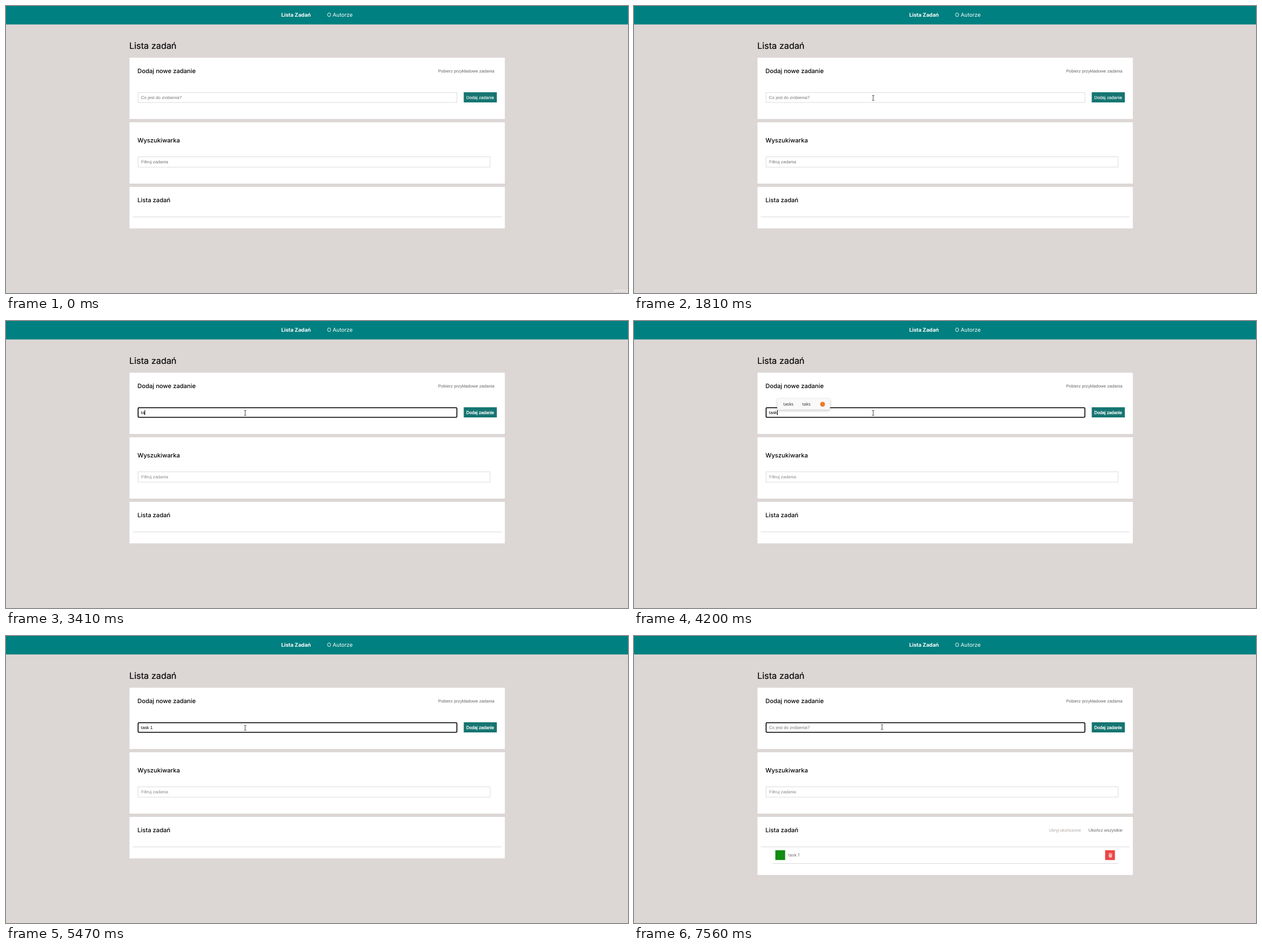
These frames come from a looping animation (1100x509 px, 8000 ms). An HTML page:

```html
<!DOCTYPE html>
<html lang="pl">
<head>
<meta charset="utf-8">
<title>Lista zadań</title>
<style>
  html, body { margin: 0; width: 100%; height: 100%; overflow: hidden; background: #dcd6d5; }
  svg { display: block; width: 100vw; height: 100vh; }
  text { text-rendering: geometricPrecision; white-space: pre; }
  .title { font: 400 15.5px Inter, sans-serif; stroke: #000; stroke-width: .15px; }
  .head { font: 500 10.7px Inter, sans-serif; }
  .nav { font: 400 9.55px Inter, sans-serif; fill: #fff; }
  .nav.on { font-weight: 700; font-size: 9.25px; }
  .ui { font: 7.67px "Liberation Sans", Arial, sans-serif; }
  .hint { fill: #757575; }
  .link { fill: #666; }
  .task { font: 400 7.5px Inter, sans-serif; fill: #707070; }
  .pop { font: 7.5px "Open Sans", sans-serif; fill: #222; }
</style>
</head>
<body>
<svg viewBox="0 0 1100 509">
  <defs>
    <filter id="soft" x="-20%" y="-50%" width="140%" height="220%">
      <feDropShadow dx="0" dy="2" stdDeviation="2" flood-opacity=".22"/>
    </filter>
  </defs>
  <rect width="1100" height="509" fill="#dcd6d5"/>
  <rect width="1100" height="32.7" fill="#008080"/>
  <text class="nav on" x="486.7" y="19.2">Lista Zadań</text>
  <text class="nav" x="567.7" y="19.2">O Autorze</text>
  <text class="title" x="218" y="76.3">Lista zadań</text>

  <g fill="#fff">
    <rect x="218.4" y="91.7" width="663.8" height="108.7"/>
    <rect x="218.4" y="206.2" width="663.8" height="108.8"/>
    <rect id="listBox" x="218.4" y="320.8" width="663.8" height="73.6"/>
  </g>

  <text class="head" x="232.5" y="118.8">Dodaj nowe zadanie</text>
  <text class="ui link" x="764.2" y="117.6">Pobierz przykładowe zadania</text>
  <rect id="field" x="233.5" y="153.5" width="564" height="17.6" fill="#fff"/>
  <text id="entry" class="ui" x="238.8" y="164.6"></text>
  <rect id="caret" y="158" width="1" height="9" fill="#000"/>
  <rect x="809.5" y="153" width="58.5" height="18" fill="#167571"/>
  <text id="button" class="ui" x="814" y="164.6" fill="#fff" stroke="#fff">Dodaj zadanie</text>

  <text class="head" x="232.5" y="242">Wyszukiwarka</text>
  <rect x="233.5" y="267.5" width="622.5" height="18.3" fill="#fff" stroke="#ddd"/>
  <text id="filter" class="ui" x="239" y="279.2">Filtruj zadania</text>

  <text class="head" x="232.5" y="348">Lista zadań</text>
  <rect x="224" y="373.5" width="652.5" height="1" fill="#d9d9d9"/>

  <g id="row">
    <text class="ui" x="734" y="346.7" fill="#aea69f">Ukryj ukończone</text>
    <text class="ui link" x="803.7" y="346.7">Ukończ wszystkie</text>
    <rect x="250" y="380" width="17.3" height="17.3" fill="#128c12"/>
    <text class="task" x="272.8" y="391.4">task 1</text>
    <rect x="833.2" y="380" width="17.3" height="17.3" fill="#ef4444"/>
    <path d="M839.2 386h6.4M839.9 387l.5 5.4h4.2l.5-5.4M841.5 387.5v4.5M843.4 387.5v4.5M841 385.3h2.8"
      fill="#d8a5a0" stroke="#eadbd8" stroke-width=".8"/>
    <rect x="244.5" y="403" width="611.5" height="1" fill="#dcdcdc"/>
  </g>

  <g id="popup">
    <rect id="popBox" x=".4" y="137.3" height="19.6" rx="3" fill="#f9f9f9" stroke="#e2e2e2" stroke-width=".6" filter="url(#soft)"/>
    <text id="word1" class="pop" x="11" y="150.2"></text>
    <text id="word2" class="pop" y="150.2"></text>
    <circle id="emoji" cy="147.6" r="4.3" fill="#ee7c2c"/>
  </g>

  <g id="corner">
    <rect x="1074.5" y="501.5" width="30" height="12" fill="#e3dfde" stroke="#d2cdcc" stroke-width=".6"/>
    <path d="M1078 508h20" stroke="#b5b1b0" stroke-dasharray="2 2"/>
  </g>

  <path id="arrow" d="M.4.5V9.6L2.5 7.7 4 11l1.5-.7L4.1 7.1H7Z" fill="#fff" stroke="#222" stroke-width=".8"/>
  <path id="beam" d="M-2-4.3H-.6L0-3.8.6-4.3H2M0-3.8V3.8M-2 4.3H-.6L0 3.8.6 4.3H2" fill="none" stroke="#333" stroke-width=".9"/>
</svg>
<script>
const LOOP = 8000, STEP = 200 / 3;
const $ = id => document.getElementById(id);

// Pointer path: [step, x, y]
const path = [
  [10, 1062, 498], [11, 1000, 445], [12, 920, 395], [14, 740, 310], [16, 600, 250],
  [18, 500, 213], [19, 480, 206], [20, 464, 199], [22, 432, 178], [23, 428, 173],
  [24, 423, 163], [101, 423, 163], [102, 433, 157], [105, 435, 157], [109, 438.7, 161.5]
];
const FIRST_BEAM = 24;

// Typed text: [time, value, caret x]
const typing = [
  [0, "", 239], [3070, "t", 241], [3410, "ta", 245], [3470, "tas", 249],
  [4000, "task", 253], [4600, "task ", 255], [4940, "task 1", 259], [5730, "", 239]
];

// Suggestions: [from, to, x, width, word, word, second word x]
const hints = [
  [3270, 3410, 241, 101, "thank", "today", 48],
  [3670, 4200, 245, 111, "taking", "tablet", 51],
  [4200, 4600, 253, 93, "tasks", "taks", 44.7],
  [4740, 5080, 255, 90, "force", "list", 44.7]
];

const caretSpans = [[2140, 2660], [3070, 4530], [4600, 5470], [6000, 6470], [7000, 7560]];

const within = (t, a, b) => t >= a && t < b;
const show = (id, on) => $(id).setAttribute("visibility", on ? "visible" : "hidden");
const set = (id, attrs) => {
  for (const key in attrs) $(id).setAttribute(key, attrs[key]);
};

function pointerAt(step) {
  const next = path.findIndex(p => p[0] > step);
  if (next < 0) return path[path.length - 1].slice(1);
  const [s0, x0, y0] = path[Math.max(next - 1, 0)], [s1, x1, y1] = path[next];
  // Between the two flicks the hand rests
  const k = s0 === 102 ? 0 : (step - s0) / (s1 - s0);
  return [x0 + (x1 - x0) * k, y0 + (y1 - y0) * k];
}

function drawPointer(t) {
  const step = Math.floor((t + 7) / STEP);
  const [x, y] = pointerAt(step);
  show("arrow", step >= path[0][0] && step < FIRST_BEAM);
  show("beam", step >= FIRST_BEAM);
  const transform = `translate(${x} ${y})`;
  set("arrow", { transform });
  set("beam", { transform });
}

function drawField(t) {
  const focused = t >= 2140;
  set("field", focused
    ? { x: 233.6, y: 153.8, width: 563.8, height: 17, rx: 1.6, stroke: "#000", "stroke-width": 1.6 }
    : { x: 233.5, y: 153.5, width: 564, height: 17.6, rx: 0, stroke: "#ddd", "stroke-width": 1 });
  const [, value, caretX] = typing.filter(k => k[0] <= t).pop();
  $("entry").textContent = value || "Co jest do zrobienia?";
  set("entry", { fill: value ? "#000" : "#757575" });
  set("caret", { x: caretX });
  show("caret", caretSpans.some(([a, b]) => within(t, a, b)));
}

function drawPopup(t) {
  const hint = hints.find(([a, b]) => within(t, a, b));
  show("popup", hint);
  if (!hint) return;
  const [, , x, width, first, second, secondX] = hint;
  set("popup", { transform: `translate(${x} 0)` });
  set("popBox", { width });
  $("word1").textContent = first;
  $("word2").textContent = second;
  set("word2", { x: secondX });
  set("emoji", { cx: width - 12.5 });
}

function draw(t) {
  const added = t >= 5730, sharp = t >= 2400;
  show("corner", t < 70);
  show("row", added);
  set("listBox", { height: added ? 103 : 73.6 });
  set("filter", { fill: sharp ? "#888" : "#757575" });
  set("button", { "stroke-width": sharp ? .3 : .1 });
  drawField(t);
  drawPopup(t);
  drawPointer(t);
}

const start = performance.now();
function tick() {
  draw((performance.now() - start) % LOOP);
  requestAnimationFrame(tick);
}
tick();
</script>
</body>
</html>
```
